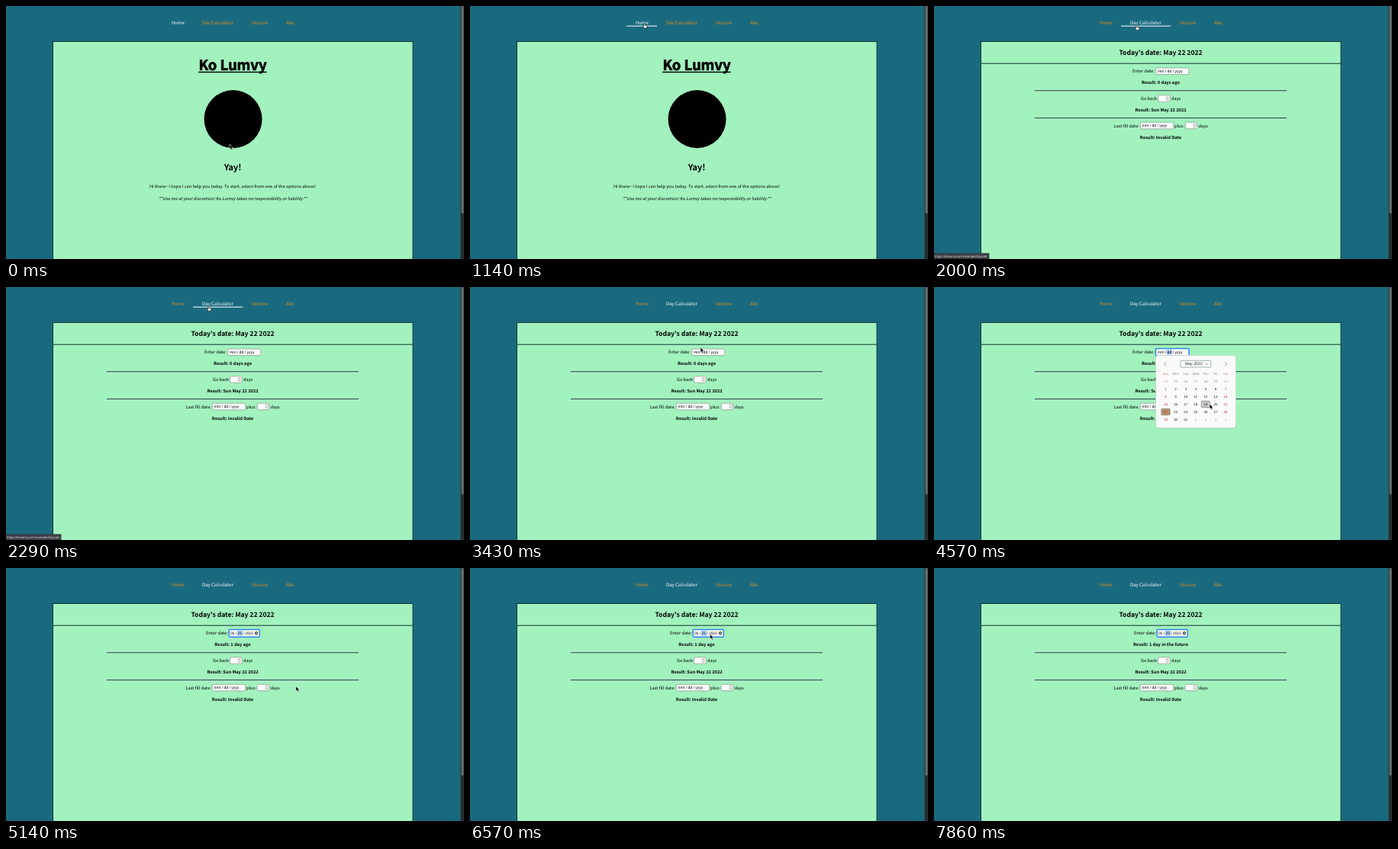
Write an HTML page that moves like this. It is 600 by 331 pixels and loops after 8 s.

```html
<!DOCTYPE html>
<html lang="en">
<head>
<meta charset="utf-8">
<title>Day calculator</title>
<style>
  html, body { margin: 0; width: 100%; height: 100%; overflow: hidden; background: #1a6a7f; }
  svg { display: block; width: 100vw; height: 100vh; }
  text {
    font: 5.65px "Noto Sans CJK JP", "Noto Sans CJK SC", "Noto Sans", sans-serif;
    text-rendering: geometricPrecision;
    white-space: pre;
  }
  .b { font-weight: 700; }
  .mid { text-anchor: middle; }
  .ui { font-family: "Liberation Sans", sans-serif; }
</style>
</head>
<body>
<svg id="stage" viewBox="0 0 600 331"></svg>
<script>
const LOOP = 8000, FPS = 7;
const CENTER = 297;

const text = (x, y, str, { size = 5.65, cls = '', fill = '#000', more = '' } = {}) =>
  `<text x="${x}" y="${y}" class="${cls}" fill="${fill}" style="font-size:${size}px;${more}">${str}</text>`;
const mid = (y, str, size, cls = 'b', more = '') =>
  text(CENTER, y, str, { size, cls: 'mid ' + cls, more });
const rect = (x, y, w, h, fill, more = '') =>
  `<rect x="${x}" y="${y}" width="${w}" height="${h}" fill="${fill}" ${more}/>`;
const line = (d, color, width) =>
  `<path d="${d}" fill="none" stroke="${color}" stroke-width="${width}"/>`;
const box = (x, y, w, h) => rect(x, y, w, h, '#fff', 'rx="1" stroke="#808080" stroke-width=".6"');

// Navigation: label, text x, hover area, address path
const links = [
  ['Home', 217, 205, 245, '/'],
  ['Day Calculator', 257, 245, 310, '/daycalc'],
  ['Vaccine', 322, 310, 355, '/vaccine'],
  ['Abx', 367, 355, 389, '/abx'],
];

const nav = (active, hover) => links.map(([label, x, left, right], i) =>
  text(x, 24.3, label, { size: 6, fill: i === active || i === hover ? '#fff' : '#e88c14' }) +
  (i === hover ? rect(left, 25.7, right - left, 1, '#fff') : '')).join('');

const home =
  mid(84, 'Ko Lumvy', 18.4, 'b', 'stroke:#000;stroke-width:.7px;stroke-linejoin:round') +
  rect(252, 85.8, 89.5, 1.4, '#000') +
  `<circle cx="297.5" cy="148" r="38" fill="#000"/>` +
  mid(215, 'Yay!', 11.2) +
  mid(237.8, 'Hi there~ I hope I can help you today. To start, select from one of the options above!', 5.65, '') +
  mid(253.8, '**Use me at your discretion! Ko Lumvy takes no responsibility or liability.**', 5.65, '', 'font-style:italic');

const spinner = x => y => box(x, y, 15.4, 8.4) +
  rect(x + 9.5, y + 1, 5, 6.4, '#e6e6e6', 'rx="1"') +
  line(`M${x + 10.9} ${y + 3.3}l1.1 -1.1 1.1 1.1m-2.2 1.8l1.1 1.1 1.1 -1.1`, '#666', .5);

const emptyDate = (x, y) => box(x, y, 43, 8.6) +
  text(x + 2.2, y + 6.2, 'mm / dd / yyyy', { size: 5.05, cls: 'ui' });

const calculator =
  mid(63.9, "Today's date: May 22 2022", 8.55) +
  line('M61 75.2H533', '#12352f', 1) +
  line('M132 110.7H462M132 146.5H462', '#33424f', 1) +
  text(271, 122.8, 'Go back') + spinner(293.7)(116.8) + text(311, 122.8, 'days') +
  mid(137.8, 'Result: Sun May 22 2022', 5.7) +
  text(235.5, 158.5, 'Last fill date:') + emptyDate(270.6, 152.2) +
  text(315, 158.5, 'plus:') + spinner(329.3)(152.2) + text(346.5, 158.5, 'days') +
  mid(173.6, 'Result: Invalid Date', 5.7);

function dateRow(day, focused) {
  const x = day ? 292.5 : 290.8, w = day ? 39.5 : 43;
  const ring = focused ? rect(x - .3, 80.6, w + .6, 9.6, '#fff', 'rx="1.2" stroke="#2f86e8" stroke-width="1.5"') : '';
  const mark = rect(day ? 302.8 : 304.6, 82, 7.2, 6.6, '#a9cdf5');
  const clear = `<circle cx="328" cy="85.3" r="2.3" fill="#555"/>` + line('M327.1 84.4l1.8 1.8m0 -1.8l-1.8 1.8', '#fff', .6);
  const field = !focused ? emptyDate(x, 81) : ring + mark +
    text(day ? 293.9 : 293, 87.2, day ? `05 / ${day} / 2022` : 'mm / dd / yyyy', { size: day ? 4.9 : 5.05, cls: 'ui' }) +
    (day ? clear : '');
  const result = { 21: '1 day ago', 23: '1 day in the future' }[day] || '0 days ago';
  return text(day ? 262 : 260, 87.3, 'Enter date:') + field + mid(102.3, 'Result: ' + result, 5.7);
}

function picker(pointer) {
  const small = (x, y, str, fill, size = 4.5) => text(x, y, str, { size, cls: 'ui mid', fill });
  const colX = c => 303.5 + 13.1 * c, rowY = r => 123.8 + 9.9 * r;
  const weekend = c => c % 6 === 0;
  let out = rect(290.3, 90.3, 105.5, 95, '#000', 'rx="4" opacity=".18"') +
    rect(290.5, 89.6, 105, 95, '#fafafa', 'rx="3.5" stroke="#c4d2ca" stroke-width=".6"') +
    line('M304.2 98l-2.5 2.5 2.5 2.5M381.2 98l2.5 2.5 -2.5 2.5', '#666', .7) +
    rect(322.8, 96.3, 40, 8.6, '#fff', 'rx="1" stroke="#7a9088" stroke-width=".7"') +
    small(340.3, 102.3, 'May 2022', '#222', 5.3) +
    line('M355.3 99.7l2 2 2 -2', '#555', .6);
  'Sun Mon Tue Wed Thu Fri Sat'.split(' ').forEach((name, c) => {
    out += small(colX(c), 115.3, name, weekend(c) ? '#d08080' : '#888', 4.3);
  });
  for (let i = 0; i < 42; i++) {
    const c = i % 7, r = Math.floor(i / 7), x = colX(c), y = rowY(r), n = i - 6;
    const inMonth = n > 0 && n <= 31;
    const label = n < 1 ? n + 30 : n > 31 ? n - 31 : n;
    const hover = Math.abs(pointer[0] - x) < 6.5 && Math.abs(pointer[1] - y) < 4.9;
    const cell = (fill, edge) => rect(x - 5.6, y - 4.2, 11.2, 8.2, fill, `rx="1" stroke="${edge}" stroke-width=".7"`);
    if (n === 22) out += cell('#b39272', '#8b7a68');
    else if (hover) out += cell('#cacaca', '#777');
    const color = weekend(c) ? (inMonth ? '#c8322b' : '#d99') : (inMonth ? '#222' : '#999');
    out += small(x, y + 1.6, label, color);
  }
  return out;
}

const arrow = '<path d="M0 0V6.6L1.6 5.2 2.7 7.6 3.9 7 2.8 4.8H4.8Z" fill="#000" stroke="#fff" stroke-width=".5"/>';
const hand = '<path d="M-.6 .4Q0 -.5 .6 .4V2.4L3 3.1Q3.6 3.4 3.4 4.2L2.8 6.4H-.4L-2.2 3.9Q-2 3 -1.2 3.5L-.6 4Z" fill="#fff" stroke="#000" stroke-width=".55"/>';

// Pointer path: time, x, y
const path = [
  [0, 293, 181], [140, 289, 168], [430, 268, 110], [710, 243, 60], [1000, 229, 28], [1140, 228.5, 22.5],
  [1290, 232, 23], [1710, 265.5, 25], [2290, 265.5, 25], [2430, 268, 32], [2710, 285, 58],
  [3000, 289, 62], [3430, 302, 79], [3570, 308, 84], [3710, 309, 86], [4000, 322, 118],
  [4290, 345, 146], [4570, 361, 153], [4860, 380, 154.5], [5140, 380, 155], [5290, 366, 136], [5430, 350, 112],
  [5860, 350, 112], [6290, 317, 88], [6430, 317, 88], [6710, 312, 85], [7000, 311, 86],
  [7290, 314, 130], [7570, 318, 162], [8000, 318, 162],
];

function pointerAt(t) {
  const i = Math.max(1, path.findIndex(p => p[0] >= t));
  const [t0, x0, y0] = path[i - 1], [t1, x1, y1] = path[i];
  const k = Math.min(1, (t - t0) / (t1 - t0));
  return [x0 + (x1 - x0) * k, y0 + (y1 - y0) * k];
}

const during = (t, from, to) => t >= from && t < to;

const stage = document.getElementById('stage');
stage.innerHTML =
  rect(0, 0, 600, 331, '#1a6a7f') +
  rect(61.5, 46.5, 471.5, 300, '#a2f2be', 'stroke="#12352f"') +
  rect(595.5, 0, 4.5, 331, '#2a2c2d') + rect(596.5, 0, 3, 271.5, '#6c6e6f', 'rx="1.5"') +
  '<g id="page"></g>' +
  '<g id="status">' + rect(0, 323.3, 74, 7.7, '#3b3d43') +
  text(1, 329, '', { size: 4.35, cls: 'ui', fill: '#d8d8d8' }) + '</g><g id="pointer"></g>';
const [page, status, pointer] = ['page', 'status', 'pointer'].map(id => document.getElementById(id));
const [statusBox, statusText] = status.children;

function render(t) {
  const pos = pointerAt(t);
  const hover = during(pos[1], 14, 27.5)
    ? links.findIndex(([, , left, right]) => during(pos[0], left, right)) : -1;
  const onCalculator = t >= 1990;
  const day = t >= 7700 ? 23 : t >= 4990 ? 21 : 0;
  const open = during(t, 3700, 4990) || during(t, 6990, 7700);

  page.innerHTML = nav(onCalculator ? 1 : 0, hover) +
    (onCalculator ? calculator + dateRow(day, t >= 3560) : home) +
    (open ? picker(pos) : '');

  const showStatus = hover >= 0 && t > 1200;
  status.style.display = showStatus ? '' : 'none';
  if (showStatus) {
    statusText.textContent = 'https://kolumvy.ork.example' + links[hover][4];
    statusBox.setAttribute('width', statusText.getComputedTextLength() + 3);
  }

  pointer.innerHTML = t < 7850 ? (hover >= 0 ? hand : arrow) : '';
  pointer.setAttribute('transform', `translate(${pos})`);
}

let shown = -1;
function tick() {
  const step = Math.floor((performance.now() % LOOP) * FPS / 1000 + .05) % (LOOP * FPS / 1000);
  if (step !== shown) render((shown = step) * 1000 / FPS);
  requestAnimationFrame(tick);
}
tick();
</script>
</body>
</html>
```
